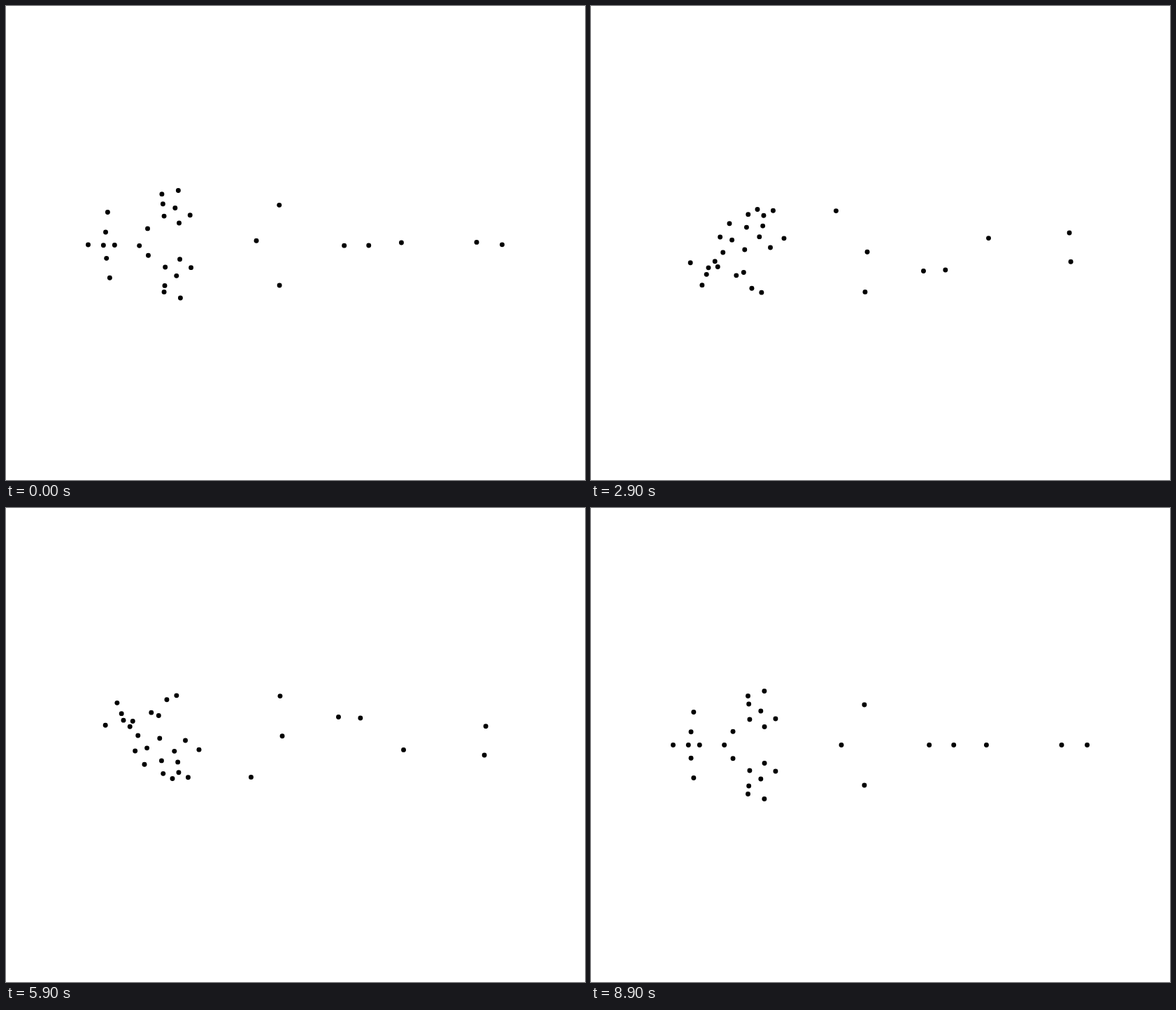
Recreate the animation shown at these times as an HTML page with a canvas. Size 828x677 px, loop 9 s.

```html
<!DOCTYPE html>
<html lang="en">
<head>
<meta charset="utf-8">
<title>Rotating points</title>
<style>
  html, body { margin: 0; width: 100%; height: 100%; overflow: hidden; background: #fff; }
  canvas { display: block; }
</style>
</head>
<body>
<canvas id="stage" width="828" height="677"></canvas>
<script>
const ctx = document.getElementById('stage').getContext('2d');
const W = 828, H = 677;
const DISTANCE = H / 2 / Math.tan(Math.PI / 6); // 60 degree field of view
const STEP = 100, STEPS = 90, RADIUS = 3.45;

const points = [];

// The body is symmetric: every point off the centre plane has a twin.
function add(x, y, z) {
  points.push([x, y, z]);
  if (y) points.push([x, -y, z]);
}

// Spine, lower and upper side
add(-279.6, 0, 33.5);
add(-240.8, 0, 40.6);
add(-204.1, 0, 50.5);
add(64, 0, 48);
add(96.5, 0, 46.2);
add(279.5, 0, 31.8);
add(-60.8, 0, -50.7);
add(153.5, 0, -7.9);
add(266.3, 0, -16.5);

// Curved row across the left end
for (let i = 0; i < 3; i++) add(-254.9 + 3.5 * i, 13 * i + 4.4 * i * i, 42.3);

// Slanted two by two patch on each flank
for (const u of [0, 1]) {
  for (const v of [0, 1]) {
    add(-195.6 + 18.4 * u + 18.9 * v, 38.2 - 10.5 * u + 11.9 * v, -26.7 - 13.2 * u + 7.7 * v);
  }
}

// Outer flank corners
add(-218.5, 19.9, -20.9);
add(-186.7, 69, 8.6);
add(-175.5, 54.5, 39.9);
add(-156.7, 72.6, 33.2);
add(-21.2, 52.9, 47.1);

function draw(time) {
  const step = Math.floor(time / STEP) % STEPS;
  const angle = (step + 1) / STEPS * 2 * Math.PI;
  const c = Math.cos(angle), s = Math.sin(angle);
  ctx.fillStyle = '#fff';
  ctx.fillRect(0, 0, W, H);
  ctx.fillStyle = '#000';
  for (const [x, y, z] of points) {
    const scale = DISTANCE / (DISTANCE - z * c + y * s);
    ctx.beginPath();
    ctx.arc(W / 2 + x * scale, H / 2 + (y * c + z * s) * scale, RADIUS, 0, 2 * Math.PI);
    ctx.fill();
  }
}

const start = performance.now();
function tick() {
  draw(performance.now() - start);
  requestAnimationFrame(tick);
}
tick();
</script>
</body>
</html>
```
